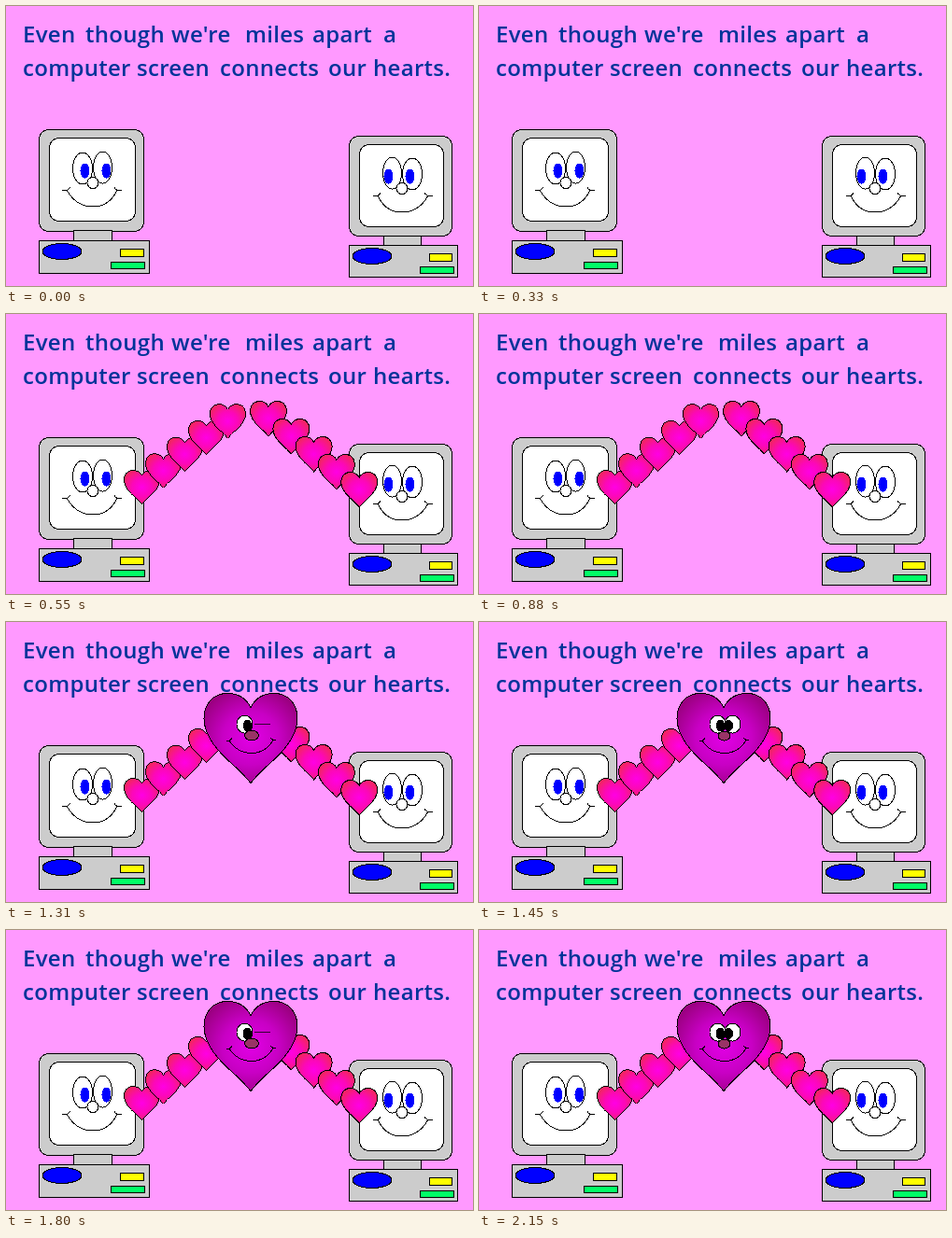
Animation of 500 by 300 pixels, one loop 2.5 s. Source, as an HTML page:

```html
<!DOCTYPE html>
<html lang="en">
<head>
<meta charset="utf-8">
<title>Connected hearts</title>
<style>
  html, body { margin: 0; width: 100%; height: 100%; overflow: hidden; background: #ff99ff; }
  svg { display: block; width: 100%; height: 100%; }
  .art { shape-rendering: crispEdges; stroke: #000; stroke-width: 1; }
  .line { fill: none; }
  .pupil { fill: #0000ff; stroke: none; }
  text { font: 600 24px "Open Sans", "Noto Sans", sans-serif; letter-spacing: .3px; fill: #003399; }
</style>
</head>
<body>
<svg viewBox="0 0 500 300">
  <defs>
    <radialGradient id="pink" cx=".5" cy=".5" r=".56">
      <stop offset="0" stop-color="#ff00e4"/>
      <stop offset=".5" stop-color="#fc08b8"/>
      <stop offset="1" stop-color="#f42462"/>
    </radialGradient>
    <radialGradient id="purple" cx=".5" cy=".5" r=".6">
      <stop offset="0" stop-color="#e200e6"/>
      <stop offset=".5" stop-color="#c800c4"/>
      <stop offset="1" stop-color="#98007c"/>
    </radialGradient>
    <path id="heart" vector-effect="non-scaling-stroke" d="M0 15C-5 5-14 0-25 0C-40 0-50 11-50 27C-50 43-40 57-25 71Q-10 84 0 96Q10 84 25 71C40 57 50 43 50 27C50 11 40 0 25 0C14 0 5 5 0 15Z"/>
    <g id="face">
      <ellipse cx="82" cy="174" rx="10.5" ry="17" fill="#fff"/>
      <ellipse cx="103.5" cy="173" rx="10" ry="17" fill="#fff"/>
      <ellipse class="pupil" cx="84.5" cy="176.5" rx="5" ry="8"/>
      <ellipse class="pupil" cx="107.5" cy="176.5" rx="5" ry="8"/>
      <circle cx="93" cy="189.5" r="6" fill="#fff"/>
      <path class="line" d="M65 197Q75 215 93 215Q111 215 119 197M60 197Q66 199 69 194M116 194Q118 199 124 197"/>
    </g>
  </defs>

  <g id="words"></g>

  <g class="art">
    <g id="cases"></g>
    <use href="#face"/>
    <use href="#face" transform="translate(517 6) scale(-1 1)"/>
    <g id="chain" fill="url(#pink)"></g>
    <g id="big">
      <use href="#heart" x="262" y="76.5" fill="url(#purple)"/>
      <ellipse cx="255.5" cy="109.5" rx="8.5" ry="9.5" fill="#fff"/>
      <ellipse cx="258.5" cy="111" rx="4.5" ry="5.5" fill="#000"/>
      <g id="open">
        <ellipse cx="271.5" cy="109.5" rx="8.5" ry="9.5" fill="#fff"/>
        <ellipse cx="267" cy="111" rx="4.5" ry="5.5" fill="#000"/>
        <ellipse cx="262.5" cy="122" rx="6.5" ry="5" fill="#993366"/>
      </g>
      <g id="wink">
        <path class="line" d="M266 109.5H283" stroke="#330033"/>
        <ellipse cx="263" cy="121.5" rx="7.5" ry="5.5" fill="#993366"/>
      </g>
      <path class="line" d="M239 127Q247 140 263 140.5Q279 140 286 126M236 128Q240 128 242 124M283 124Q285 127 289 126"/>
    </g>
  </g>
</svg>
<script>
const NS = 'http://www.w3.org/2000/svg';
const byId = id => document.getElementById(id);

function add(parent, tag, attrs) {
  const el = document.createElementNS(NS, tag);
  for (const key in attrs) el.setAttribute(key, attrs[key]);
  return parent.appendChild(el);
}

function addLine(y, line) {
  for (const [word, x] of line) add(byId('words'), 'text', { x, y }).textContent = word;
}

// Corners are whole pixels; the half-pixel shift keeps outlines sharp.
function box(fill, [left, top, right, bottom], rx = 0) {
  add(byId('cases'), 'rect', {
    x: left + .5, y: top + .5, width: right - left, height: bottom - top, rx, fill
  });
}

function addComputer({ monitor, screen, stand, base, yellow, green }) {
  box('#ccc', monitor, 10);
  box('#fff', screen, 10);
  box('#ccc', stand);
  box('#ccc', base);
  box('#ffff00', yellow);
  box('#00ff66', green);
  add(byId('cases'), 'ellipse', {
    cx: base[0] + 25, cy: base[1] + 12, rx: 21, ry: 8.5, fill: '#0000ff'
  });
}

function addHearts(x, y, dx, dy, scale) {
  for (let i = 0; i < 5; i++) {
    const transform = `translate(${x + i * dx} ${y + i * dy}) scale(${scale})`;
    add(byId('chain'), 'use', { href: '#heart', transform });
  }
}

addLine(39, [['Even', 18], ['though', 85], ["we're", 177], ['miles', 256], ['apart', 328], ['a', 404]]);
addLine(75, [['computer', 18], ['screen', 140], ['connects', 229], ['our', 345], ['hearts.', 393]]);
addComputer({
  monitor: [35, 132, 147, 241], screen: [46, 141, 138, 230], stand: [72, 240, 113, 251],
  base: [35, 251, 153, 286], yellow: [122, 260, 147, 268], green: [112, 274, 148, 281]
});
addComputer({
  monitor: [367, 139, 477, 246], screen: [378, 148, 468, 236], stand: [404, 246, 444, 256],
  base: [367, 256, 483, 290], yellow: [453, 265, 477, 273], green: [443, 279, 479, 286]
});
addHearts(145.5, 167.5, 23, -17.7, .38);
addHearts(281, 93.5, 24.3, 19, .39);

const LOOP = 2500, CHAIN = 550, BIG = 1100, BLINK = 350;

function show(id, on) {
  byId(id).style.display = on ? '' : 'none';
}

function draw(t) {
  const winking = Math.floor((t - BIG) / BLINK) % 2 === 0;
  show('chain', t >= CHAIN);
  show('big', t >= BIG);
  show('wink', winking);
  show('open', !winking);
}

let start;
function tick(now) {
  start ??= now;
  draw((now - start) % LOOP);
  requestAnimationFrame(tick);
}
draw(0);
requestAnimationFrame(tick);
</script>
</body>
</html>
```
